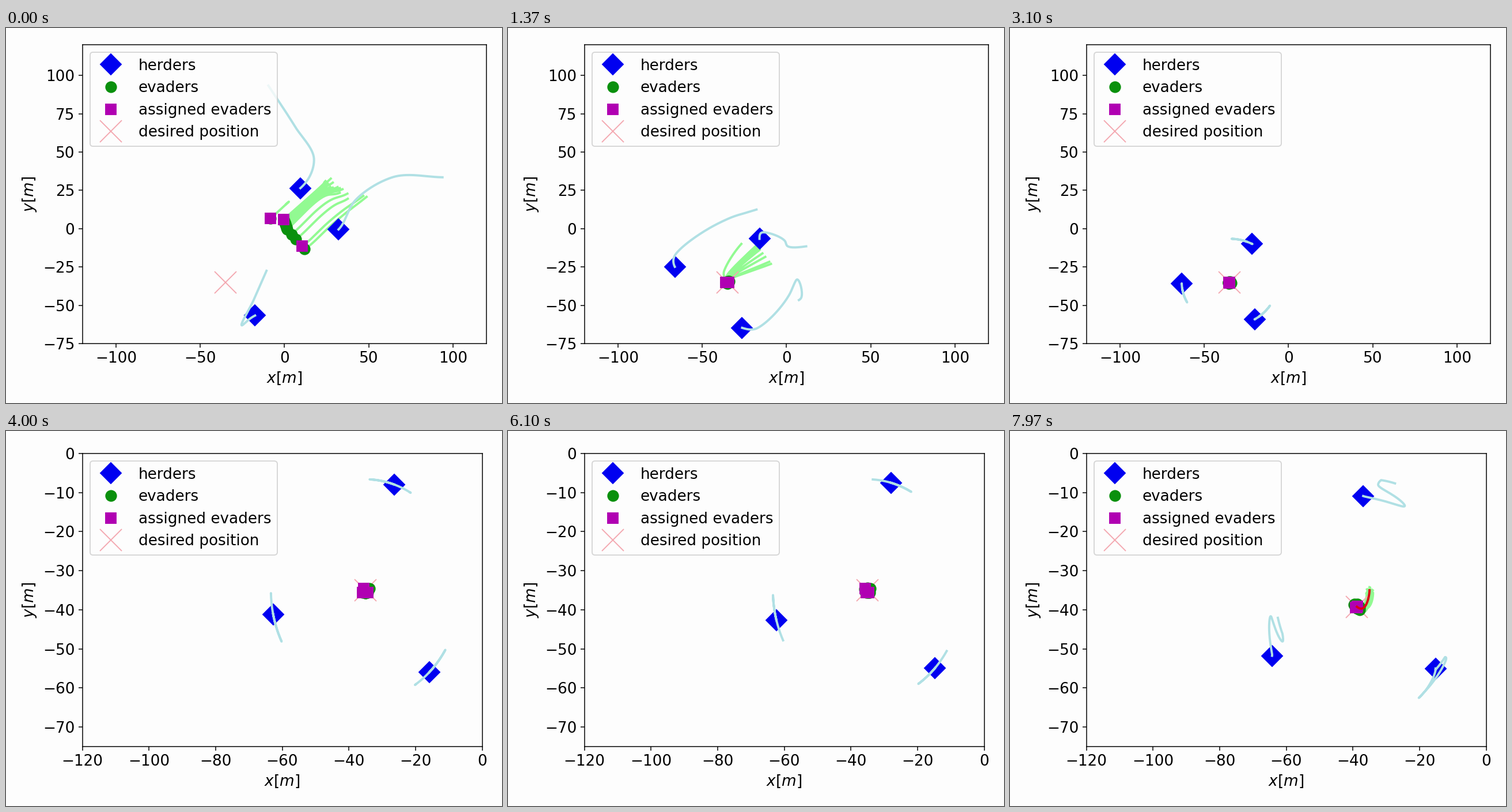
Write a matplotlib script that moves like this. It is 861 px wide and 650 px high and loops after 8000 ms.

```python
import numpy as np
import matplotlib.pyplot as plt
from matplotlib.animation import FuncAnimation

W, H, DPI = 861, 650, 128
K = 135 / DPI                     # scale of point sizes
FRAMES, INTERVAL = 200, 40
TRAIL = 100                       # samples per trail, 10 ms each
ZOOM_AT = 3.68
PAPER = "#fdfdfd"
BLUE, GREEN, PURPLE, PINK = "#0000f0", "#0a900d", "#b000b2", "#f4a8b0"

plt.rcParams.update({
    "font.family": "DejaVu Sans",
    "font.size": 14 * K,
    "axes.linewidth": 0.8 * K,
    "axes.labelpad": 4 * K,
    "axes.facecolor": PAPER,
    "figure.facecolor": PAPER,
    "savefig.facecolor": PAPER,
    "patch.linewidth": 1.0 * K,
    "lines.markeredgewidth": 1.0 * K,
})
for axis in ("xtick", "ytick"):
    plt.rcParams[axis + ".major.size"] = 3.5 * K
    plt.rcParams[axis + ".major.pad"] = 3.5 * K
    plt.rcParams[axis + ".major.width"] = 0.8 * K

T = -0.99 + 0.01 * np.arange(902)


def spline(t, kt, kp):
    """Cubic Hermite curve through points kp at times kt."""
    kt, kp = np.asarray(kt, float), np.asarray(kp, float)
    slope = np.gradient(kp, kt, axis=0)
    t = np.clip(t, kt[0], kt[-1])
    i = np.clip(np.searchsorted(kt, t, side="right") - 1, 0, len(kt) - 2)
    h = (kt[i + 1] - kt[i])[:, None]
    u = ((t - kt[i]) / (kt[i + 1] - kt[i]))[:, None]
    return ((1 + 2 * u) * (1 - u) ** 2 * kp[i] + u * (1 - u) ** 2 * h * slope[i]
            + u * u * (3 - 2 * u) * kp[i + 1] + u * u * (u - 1) * h * slope[i + 1])


def approach(kt, kp, then, start):
    """Follow the key points, then join the path `then` at time `start`."""
    i = np.searchsorted(T, start)
    run = spline(T, kt + [T[i], T[i + 5]], kp + [then[i], then[i + 5]])
    return np.where(T[:, None] < T[i], run, then)


# desired position: at rest, then a quarter turn about a point to its left
turn = np.clip((T - 7.15) / 0.85, 0, 1)
goal = np.c_[-35 - 4 * turn ** 1.6, -35 - 4.7 * np.sin(2.1 * turn)]

# herders: driven in, then swinging together on a circle round the goal
TURN_TIMES = [1.6, 2.5, 3.05, 3.74, 4.16, 4.95, 5.8, 6.3, 6.66, 7.25, 7.6, 8.0]
TURN_ANGLES = [-31, 13, -13, 13, -8, 14, -12, 9, -12, 10, -9.5, 12]
RADIUS = 28.4


def swing(t):
    phase = np.interp(t, TURN_TIMES, range(len(TURN_TIMES)))
    i = np.minimum(phase.astype(int), len(TURN_TIMES) - 2)
    a, b = np.array(TURN_ANGLES)[[i, i + 1]]
    return (a + b) / 2 + (a - b) / 2 * np.cos(np.pi * (phase - i))


def herder(base, points):
    a = np.radians(base + swing(T))
    circle = goal + RADIUS * np.c_[np.cos(a), np.sin(a)]
    return approach(CHASE, points, circle, 1.6)


CHASE = [-1, -.6, -.27, 0, .2, .4, .6, .73, 1.13, 1.4]
herders = [
    herder(194.5, [(-10, 94), (6, 67), (17.5, 45), (10, 27), (-5, 17.3),
                   (-20, 11.7), (-33.5, 7), (-43, 2), (-66, -17), (-66, -25.5)]),
    herder(74.5, [(94.5, 33.5), (64, 33.5), (42, 18.5), (32.5, 0), (22, -8.5),
                  (10, -11.8), (.7, -11.5), (-1, -8), (-14.5, -2.5), (-16, -7.5)]),
    herder(-45.5, [(-10.5, -27), (-18.5, -47), (-25.5, -63), (-18, -57), (-5, -50.3),
                   (8.5, -45.5), (6, -33.3), (1.7, -43), (-17.5, -65), (-27, -64.5)]),
]

# evaders: spread between four lanes that run to the goal
DRIVE = [-1, -.27, 0, .35, .73]
LANES = np.array([
    [(1, 16), (0, 15), (-8, 7), (-26, -9), (-37, -27.5)],
    [(27, 34), (16, 22), (0, 6.5), (-16, -9), (-34, -28.5)],
    [(36, 25), (16, 15), (2, 0), (-15, -13), (-33, -30)],
    [(49, 21), (26.5, 1), (12.5, -13), (-8, -22.5), (-32, -32)],
], float)
rng = np.random.default_rng(5)


def evader(lane):
    i = min(int(lane), len(LANES) - 2)
    keys = LANES[i] + (lane - i) * (LANES[i + 1] - LANES[i])
    if 0 < lane < 3:
        keys[0] = keys[1] + (keys[0] - keys[1]) * rng.uniform(.75, 1)
    a, p, q = rng.uniform(0, 2 * np.pi, 3)
    r = rng.uniform(.3, .8)
    wobble = np.c_[np.sin(2.3 * T + p), np.cos(2.9 * T + q)] * (.5, .4)
    rest = goal + r * np.array([np.cos(a), .85 * np.sin(a)]) + wobble
    return approach(DRIVE, list(keys), rest, 1.1)


picked = [evader(lane) for lane in (0, 1, 2.85)]
evaders = picked + [evader(lane) for lane in (*np.linspace(1.1, 2, 9), 2.25, 2.5, 3)]

fig = plt.figure(figsize=(W / DPI, H / DPI), dpi=DPI)
ax = fig.add_axes([0.1, 0.1, 0.8, 0.8])


def dots(marker, size, color, label, z):
    return ax.plot([], [], linestyle="", marker=marker, ms=size * K, color=color,
                   label=label, zorder=z)[0]


def path(color, z):
    return ax.plot([], [], color=color, lw=2.1 * K, zorder=z)[0]


herder_dots = dots("D", 13.8, BLUE, "herders", 2.5)
evader_dots = dots("o", 9.8, GREEN, "evaders", 3)
picked_dots = dots("s", 9.8, PURPLE, "assigned evaders", 3.5)
goal_mark = dots("x", 20, PINK, "desired position", 2.2)
evader_path = path("#92fa92", 2)
herder_path = path("#b0e0e4", 4)
goal_path = path("#dc0014", 4.2)

ax.set_xlabel("$x[m]$")
ax.set_ylabel("$y[m]$")
ax.legend(loc="upper left", labelspacing=0.48)


def set_view(zoomed):
    right, top = (826.5, 39) if zoomed else (834.5, 29)
    left, bottom = 132.5, 547
    ax.set_position([left / W, 1 - bottom / H, (right - left) / W, (bottom - top) / H])
    if zoomed:
        ax.set_xticks(range(-120, 1, 20))
        ax.set_yticks(range(-70, 1, 10))
        ax.set_xlim(-120, 0)
        ax.set_ylim(-75, 0)
    else:
        ax.set_xticks(range(-100, 101, 50))
        ax.set_yticks(range(-75, 101, 25))
        ax.set_xlim(-120, 120)
        ax.set_ylim(-75, 120)


def place(artist, tracks, i):
    artist.set_data(*np.array([p[i] for p in tracks]).T)


def trace(artist, tracks, i):
    gap = [[np.nan, np.nan]]
    parts = [np.vstack([p[i - TRAIL:i + 1], gap]) for p in tracks]
    artist.set_data(*np.vstack(parts).T)


def update(frame):
    i = TRAIL + 4 * frame
    zoomed = T[i] >= ZOOM_AT
    if frame == 0 or zoomed != (T[i - 4] >= ZOOM_AT):
        set_view(zoomed)
    place(herder_dots, herders, i)
    place(evader_dots, evaders, i)
    place(picked_dots, picked, i)
    place(goal_mark, [goal], i)
    trace(herder_path, herders, i)
    trace(evader_path, evaders, i)
    trace(goal_path, [goal], i)
    goal_path.set_visible(turn[i] > 0)
    return []


def reset():
    set_view(False)
    return update(0)


anim = FuncAnimation(fig, update, frames=FRAMES, init_func=reset,
                     interval=INTERVAL, repeat=True, repeat_delay=0,
                     cache_frame_data=False)
plt.show()
```
